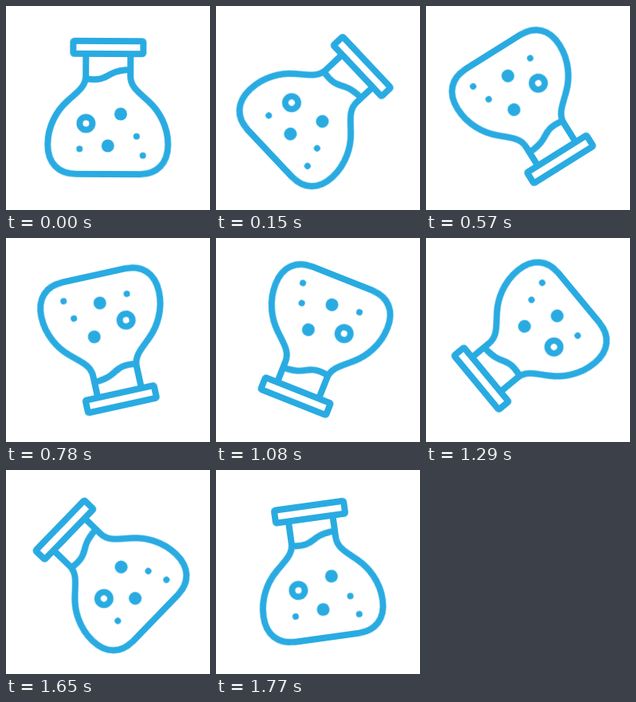
Write an HTML page without scripts that moves like this. It is 256x256 px and loops after 1.8 s.

```html
<!DOCTYPE html>
<html lang="en">
<head>
<meta charset="utf-8">
<title>Spinning flask</title>
<style>
  html, body { margin: 0; width: 100%; height: 100%; overflow: hidden; background: #fff; }
  svg { display: block; width: 100vw; height: 100vh; }
  .flask {
    fill: none;
    stroke: #29abe2;
    stroke-width: 8;
    stroke-linejoin: round;
    transform-origin: 128px 128px;
    animation: spin 1.8s infinite;
  }
  .dots { fill: #29abe2; stroke: none; }

  /* fast, slow while upside down, fast again */
  @keyframes spin {
    0%      { transform: rotate(0deg);     animation-timing-function: cubic-bezier(.333, .313, .667, .719); }
    18.333% { transform: rotate(100deg);   animation-timing-function: cubic-bezier(.333, .427, .667, .766); }
    31.667% { transform: rotate(147.8deg); animation-timing-function: cubic-bezier(.333, .498, .667, .698); }
    43.333% { transform: rotate(167.5deg); animation-timing-function: cubic-bezier(.333, .25, .667, .618); }
    60%     { transform: rotate(201.5deg); animation-timing-function: cubic-bezier(.333, .266, .667, .52); }
    83.333% { transform: rotate(270deg);   animation-timing-function: cubic-bezier(.333, .259, .667, .676); }
    98.333% { transform: rotate(351.8deg); animation-timing-function: linear; }
    100%    { transform: rotate(360deg); }
  }
</style>
</head>
<body>
<svg viewBox="0 0 256 256">
  <g class="flask">
    <rect x="84" y="44" width="88" height="16" rx="1.5"/>
    <path d="M100 60V88C100 102 88 109 76.500 120C64.500 131 52.500 150 52.500 174C52.500 197 66 211 88 211H168C190 211 203.500 197 203.500 174C203.500 150 191.500 131 179.500 120C168 109 156 102 156 88V60"/>
    <path d="M100 91C117 95 125 89 132 85C140 81 148 80 156 80"/>
    <circle cx="100.500" cy="147.500" r="8"/>
    <g class="dots">
      <circle cx="144" cy="135.500" r="8"/>
      <circle cx="128" cy="175.500" r="8"/>
      <circle cx="92.500" cy="179.500" r="4"/>
      <circle cx="164" cy="163.500" r="4"/>
      <circle cx="172" cy="187.500" r="4"/>
    </g>
  </g>
</svg>
</body>
</html>
```
